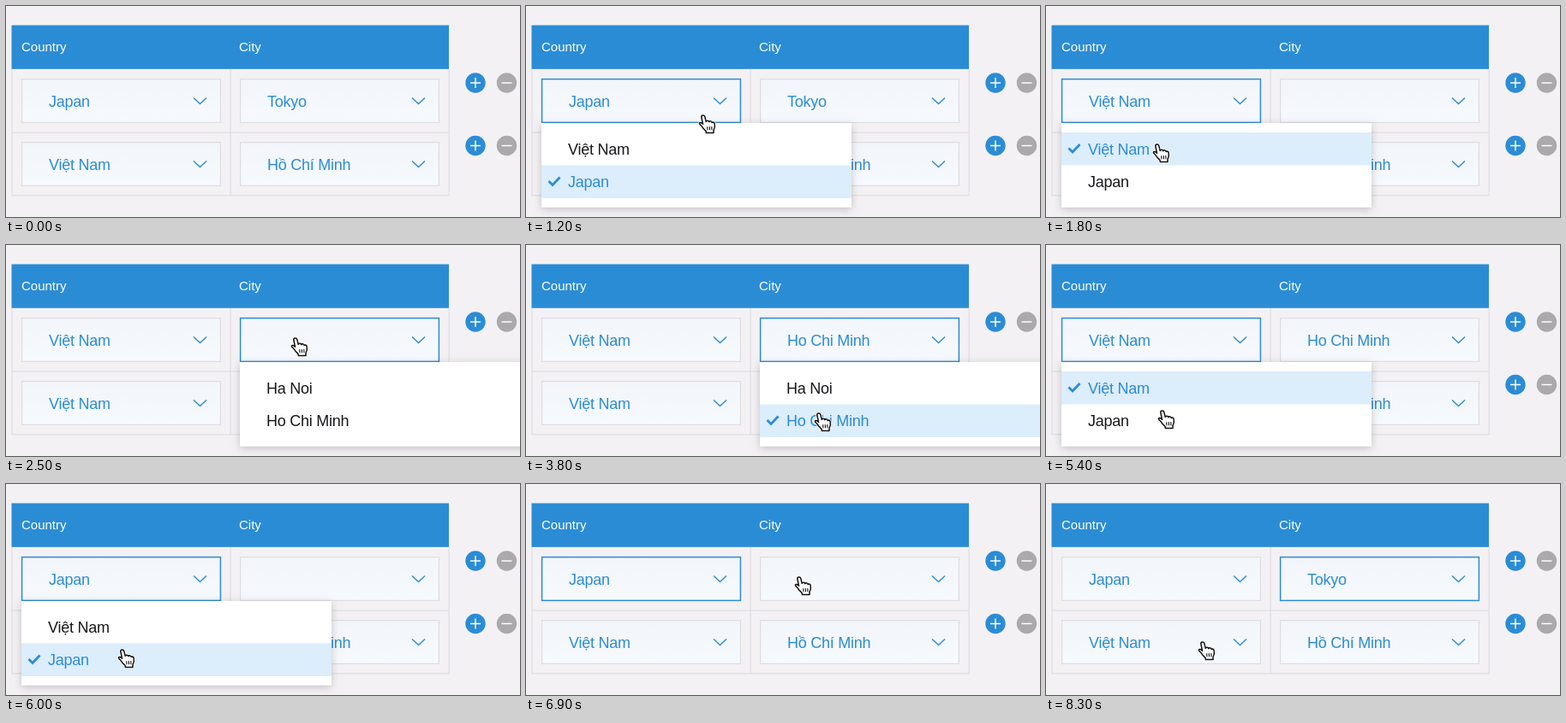
An HTML page with a canvas for the animation above (8.4 s loop, 600 by 247 pixels).

```html
<!DOCTYPE html>
<html lang="en">
<head>
<meta charset="utf-8">
<title>Dependent dropdowns</title>
<style>
  html, body { margin: 0; width: 100%; height: 100%; overflow: hidden; background: #f3f1f4; }
  canvas { display: block; width: 600px; height: 247px; }
</style>
</head>
<body>
<canvas></canvas>
<script>
const LOOP = 8400, STEP = 100;
const BLUE = '#2b8cd6', LINE = '#dedde1', PAGE = '#f3f1f4';
const FONT = '"Liberation Sans", Arial, sans-serif';
const COUNTRIES = ['Việt Nam', 'Japan'];
const CITIES = { 'Việt Nam': ['Ha Noi', 'Ho Chi Minh'], 'Japan': ['Tokyo', 'Osaka'] };
const COLUMN = { country: 18, city: 273 };

// Each entry overrides part of the form state from its time on.
const EVENTS = [
  [0, { country: 'Japan', city: 'Tokyo', focus: null, open: null }],
  [1000, { focus: 'country', open: 'country' }],
  [1700, { country: 'Việt Nam', city: '' }],
  [1900, { open: null }],
  [2400, { focus: 'city', open: 'city' }],
  [3300, { city: 'Ho Chi Minh' }],
  [4000, { open: null }],
  [4900, { focus: 'country', open: 'country' }],
  [5700, { country: 'Japan', city: '' }],
  [6100, { open: null }],
  [7100, { focus: 'city', open: 'city' }],
  [7700, { city: 'Tokyo' }],
  [7900, { open: null }],
];

// Pointer tip: time, x, y
const PATH = [
  [300, 546, 170], [900, 207, 114], [1000, 207, 116], [1200, 207, 128],
  [1600, 130, 162], [1900, 130, 162], [2300, 338, 109], [2800, 338, 109],
  [3200, 342, 197], [3900, 342, 197], [4600, 192, 112], [4900, 192, 112],
  [5400, 136, 194], [6200, 136, 194], [6900, 319, 109], [7200, 330, 109],
  [7600, 335, 162], [7900, 335, 162], [8300, 183, 185],
];

const HAND = new Path2D('M-2.2 2C-2.4-.4 1.2-.7 1.8 1.6L3.2 7.4C3.6 5.7 6.4 5.8 6.8 7.7' +
  'C7.5 6.2 9.9 6.7 10.2 8.6C11.2 7.4 13 8.4 13.2 10.2C13.7 13 13.3 15.3 12 17.4L12 20.6' +
  'L3.4 20.6L3 18.4C.8 16.4-.8 14.6-2 12.6C-3.3 11-4.7 10.5-4.6 9.2C-4.2 7.8-2 8.4-.5 10.3Z');
const CREASES = new Path2D('M4.6 13.2L5 17.2M7.2 13.1L7.5 17.2M9.8 13L9.9 17.2');

const canvas = document.querySelector('canvas');
const ratio = window.devicePixelRatio || 1;
canvas.width = 600 * ratio;
canvas.height = 247 * ratio;
const ctx = canvas.getContext('2d');

function rect(x, y, w, h, color) {
  ctx.fillStyle = color;
  ctx.fillRect(x, y, w, h);
}

function text(value, x, y, color, size = 18) {
  ctx.font = `${size}px ${FONT}`;
  ctx.letterSpacing = size === 18 ? '-0.25px' : '0px';
  ctx.fillStyle = color;
  ctx.fillText(value, x, y);
}

function polyline(points, color, width) {
  ctx.beginPath();
  points.forEach(([x, y]) => ctx.lineTo(x, y));
  ctx.strokeStyle = color;
  ctx.lineWidth = width;
  ctx.stroke();
}

function select(x, y, value, focused) {
  const fill = ctx.createLinearGradient(0, y, 0, y + 52);
  fill.addColorStop(0, '#f2f5fa');
  fill.addColorStop(1, '#f6f9fd');
  rect(x, y, 233, 52, fill);
  ctx.strokeStyle = focused ? BLUE : LINE;
  ctx.lineWidth = focused ? 1.5 : 1.2;
  ctx.strokeRect(x + .6, y + .6, 231.8, 50.8);
  text(value, x + 32, y + 33, BLUE);
  polyline([[x + 201, y + 22.5], [x + 208.5, y + 29.5], [x + 216, y + 22.5]], BLUE, 1.4);
}

function roundButton(x, y, color, plus) {
  ctx.beginPath();
  ctx.arc(x, y, 11.7, 0, 7);
  ctx.fillStyle = color;
  ctx.fill();
  polyline([[x - 6, y], [x + 6, y]], '#fff', 1.5);
  if (plus) polyline([[x, y - 6], [x, y + 6]], '#fff', 1.5);
}

function menu(x, options, chosen) {
  ctx.save();
  ctx.shadowColor = 'rgba(0,0,0,.2)';
  ctx.shadowBlur = 9 * ratio;
  ctx.shadowOffsetY = 2 * ratio;
  rect(x, 137, 362, 98.5, '#fff');
  ctx.restore();
  rect(x, 137, 362, 98.5, '#fff');
  options.forEach((option, i) => {
    const y = 148 + i * 38.5, active = option === chosen;
    if (active) {
      rect(x, y, 362, 38.5, '#dcedfb');
      polyline([[x + 8.5, y + 18.5], [x + 13, y + 23], [x + 21.5, y + 14]], BLUE, 2.8);
    }
    text(option, x + 31, y + 25.5, active ? BLUE : '#18181c');
  });
}

function pointer(t) {
  const next = PATH.findIndex(p => p[0] >= t);
  if (t < PATH[0][0]) return;
  const b = PATH[next], a = PATH[Math.max(0, next - 1)];
  const u = (t - a[0]) / (b[0] - a[0] || 1), k = u * u * (3 - 2 * u);
  ctx.save();
  ctx.translate(a[1] + (b[1] - a[1]) * k, a[2] + (b[2] - a[2]) * k);
  ctx.lineJoin = 'round';
  ctx.strokeStyle = '#fff';
  ctx.lineWidth = 3;
  ctx.stroke(HAND);
  ctx.fillStyle = '#fff';
  ctx.fill(HAND);
  ctx.strokeStyle = '#111';
  ctx.lineWidth = 1.5;
  ctx.stroke(HAND);
  ctx.lineWidth = 1.1;
  ctx.stroke(CREASES);
  ctx.restore();
}

function draw(t) {
  const state = Object.assign({}, ...EVENTS.filter(e => e[0] <= t).map(e => e[1]));
  ctx.setTransform(ratio, 0, 0, ratio, 0, 0);
  rect(0, 0, 600, 247, PAGE);

  for (const x of [6.5, 261.5, 516.5]) rect(x, 74, 1.2, 148, LINE);
  for (const y of [147.5, 221.3]) rect(6.5, y, 511, 1.2, LINE);
  rect(6.5, 22.5, 510.5, 51.3, BLUE);
  text('Country', 18, 53, '#fff', 15);
  text('City', 272, 53, '#fff', 15);

  select(COLUMN.country, 85, state.country, state.focus === 'country');
  select(COLUMN.city, 85, state.city, state.focus === 'city');
  select(COLUMN.country, 159, 'Việt Nam');
  select(COLUMN.city, 159, 'Hồ Chí Minh');
  for (const y of [90, 163.5]) {
    roundButton(548, y, BLUE, true);
    roundButton(584.5, y, '#aba9ab', false);
  }

  if (state.open) {
    const options = state.open === 'country' ? COUNTRIES : CITIES[state.country];
    menu(COLUMN[state.open], options, state[state.open]);
  }
  pointer(t);
}

const start = performance.now();
function frame() {
  const t = (performance.now() - start) % LOOP;
  draw(Math.floor(t / STEP) * STEP);
  requestAnimationFrame(frame);
}
frame();
</script>
</body>
</html>
```
